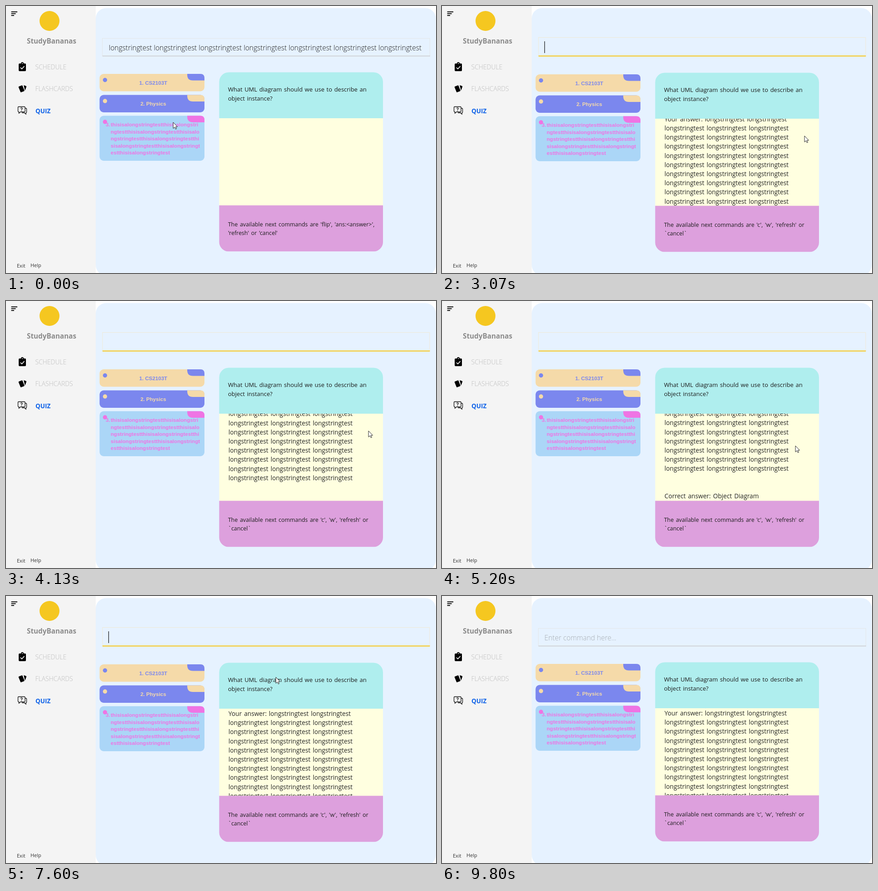
An HTML page that plays this animation: 949 by 590 pixels, repeating every 9.94 s.

```html
<!DOCTYPE html>
<html lang="en">
<head>
<meta charset="utf-8">
<title>StudyBananas</title>
<style>
html, body { margin: 0; width: 100%; height: 100%; overflow: hidden; background: #fff; }
svg { display: block; width: 949px; height: 590px; }
text { white-space: pre; font-family: "Open Sans", "Noto Sans", sans-serif; }
.menu { font-size: 14px; font-weight: 300; fill: #bcbcbc; }
.foot { font-size: 11px; fill: #333; }
.input { font-size: 15.5px; font-weight: 300; }
.topic text { font: bold 11.6px "Liberation Sans", Arial, sans-serif; }
.ask { font-size: 13px; word-spacing: 1.2px; fill: #1c1c1c; }
.reply { font-size: 13.7px; word-spacing: 1.6px; fill: #262626; }
.hint { font-size: 12.4px; word-spacing: 1.5px; fill: #1c1c1c; }
</style>
</head>
<body>
<svg viewBox="0 0 949 590">
  <defs>
    <clipPath id="cardClip"><rect x="470.500" y="146.500" width="361.500" height="396" rx="21"/></clipPath>
    <clipPath id="replyClip"><rect x="471" y="248" width="361" height="192.500"/></clipPath>
  </defs>

  <rect width="198" height="590" fill="#f4f4f4"/>
  <rect x="198" y="4.500" width="750.500" height="591" rx="23" fill="#e6f2ff"/>

  <path d="M11.500 13H25M11.500 17H21.500M11.500 21H18" stroke="#111" stroke-width="1.800"/>
  <circle cx="96" cy="33" r="22" fill="#f5c720"/>
  <text x="46" y="83" font-size="15.300" font-weight="700" fill="#8b8b8b">StudyBananas</text>

  <path d="M30 127H33A3 3 0 0 1 39 127H42Q44 127 44 129V142Q44 144 42 144H30Q28 144 28 142V129Q28 127 30 127Z"/>
  <path d="M32 136L35 139L40.500 133" fill="none" stroke="#fff" stroke-width="1.700"/>
  <circle cx="36" cy="127.300" r="1" fill="#fff"/>
  <g transform="translate(36 182.500)">
    <path d="M3 -7.500L8.200 -5.800Q9.300 -5.300 9 -4.100L6 4.500Z"/>
    <rect x="-5.800" y="-7.500" width="10.500" height="15" rx="2" transform="translate(-1.300 .3) rotate(-22)" stroke="#f4f4f4" stroke-width="1.200"/>
  </g>
  <g fill="none" stroke="#111" stroke-width="1.300">
    <path d="M28 222.500H40.500Q42 222.500 42 224V232.500Q42 234 40.500 234H32L28.500 237V234H28Q26.500 234 26.500 232.500V224Q26.500 222.500 28 222.500Z"/>
    <path d="M42 226H44Q45.500 226 45.500 227.500V234.500Q45.500 236 44 236V239L40.500 236H35"/>
    <path d="M32.300 226.500Q32.500 224.800 34.300 224.800Q36.200 224.900 36.200 226.500Q36.200 227.600 34.300 228.500V230M34.300 231V232.200"/>
  </g>
  <text class="menu" x="64.500" y="139.500">SCHEDULE</text>
  <text class="menu" x="64.500" y="188">FLASHCARDS</text>
  <text x="65" y="236.500" font-size="13.600" font-weight="700" fill="#0f62e8">QUIZ</text>
  <text class="foot" x="24" y="577.500">Exit</text>
  <text class="foot" x="54" y="576.500">Help</text>

  <g id="idle">
    <rect x="212.500" y="71.500" width="723" height="39" fill="none" stroke="#e4e7e8"/>
    <path d="M213 110.500H936" stroke="#c9c9c9" stroke-width="1.300"/>
  </g>
  <g id="active">
    <rect x="213" y="69.500" width="722" height="41" fill="none" stroke="#efe9d6"/>
    <path d="M213 110.500H935.500" stroke="#f9c614" stroke-width="2"/>
  </g>
  <text id="typed" class="input" fill="#1b1b1b"></text>
  <text id="prompt" class="input" x="226" y="97.500" fill="#a5abb1">Enter command here...</text>
  <path id="caret" stroke="#111" stroke-width="1.200"/>

  <g id="body">
    <g id="topics"></g>
    <g clip-path="url(#cardClip)">
      <rect x="470" y="146" width="362" height="102" fill="#afeeee"/>
      <rect x="470" y="248" width="362" height="193" fill="#ffffe0"/>
      <rect x="470" y="440.500" width="362" height="102" fill="#dda0dd"/>
    </g>
    <text class="ask" x="490" y="189">What UML diagram should we use to describe an</text>
    <text class="ask" x="490" y="209">object instance?</text>
    <g clip-path="url(#replyClip)"><g id="reply"></g></g>
    <text class="hint" id="hint1" x="490" y="487"></text>
    <text class="hint" id="hint2" x="490" y="506"></text>
  </g>

  <path id="arrow" d="M0 0V13.500L3.200 10.700L5.400 15.200L7.400 14.200L5.300 9.900H9.400Z" fill="#fff" stroke="#111" stroke-width="0.900"/>
  <path id="beam" d="M-2.500 -6H-.5L0 -5.500L.5 -6H2.500M0 -5.500V5.500M-2.500 6H-.5L0 5.500L.5 6H2.500" fill="none" stroke="#111"/>
</svg>
<script>
const LOOP = 9940, FPS = 15;
const CLICK = 730, ENTER = 1600, BLUR = 9800;
const NOTCH = 10.2, LINE = 20.2, ROWS = 10;
const WORD = "longstringtest";

// pointer path: time, x, y
const path = [
  [70, 369, 257], [330, 440, 185], [530, 590, 106], [670, 615, 98],
  [1940, 615, 98], [2130, 662, 140], [2400, 770, 270], [2600, 811, 338], [2800, 800, 287],
  [4530, 800, 287], [4800, 796, 305], [5200, 780, 320],
  [6200, 780, 320], [6600, 698, 279],
  [7330, 698, 279], [7600, 604, 181], [7730, 330, 128], [7800, 66, 120], [7930, 100, 128],
  [8870, 100, 128], [9200, 150, 330], [9500, 260, 520], [9730, 330, 606]
];
// scroll position in wheel notches from a given time on
const wheel = [
  [0, 0], [3070, 1], [3330, 2], [3530, 3], [3930, 4], [4000, 5],
  [4200, 6], [4270, 7], [5470, 5], [5530, 3], [5670, 1], [5730, 0]
];

const $ = id => document.getElementById(id);
const repeat = n => Array(n).fill(WORD).join(" ");

function add(parent, tag, attrs, content = "") {
  const node = document.createElementNS("http://www.w3.org/2000/svg", tag);
  for (const key in attrs) node.setAttribute(key, attrs[key]);
  node.textContent = content;
  parent.append(node);
  return node;
}

function topic(y, height, fill, ink, label) {
  const g = add($("topics"), "g", { class: "topic", transform: `translate(206.500 ${y})` });
  add(g, "rect", { width: 231.5, height, rx: 9, fill });
  add(g, "path", { d: "M193.500 0H222.500Q231.500 0 231.500 9V14.500H206Q193.500 14.500 193.500 2Z", fill: ink });
  add(g, "circle", { cx: 12, cy: 13.5, r: 4.7, fill: ink });
  if (label) add(g, "text", { x: 118.5, y: 23.5, "text-anchor": "middle", fill: ink }, label);
  return g;
}

function build() {
  const peach = "#f5daa9", indigo = "#7b87ee", pink = "#ef74e4";
  topic(150, 38.5, peach, indigo, "1. CS2103T");
  topic(196.5, 38.5, indigo, peach, "2. Physics");
  const long = topic(242.5, 99.5, "#abd6f7", pink);
  add(long, "text", { x: 13.5, y: 23.5, fill: pink }, "3.");
  const name = "thisisalongstringtest".repeat(8);
  [0, 36, 72, 108, 144].forEach((at, i) =>
    add(long, "text", { x: 24.5, y: 23.5 + i * 15.5, fill: pink }, name.slice(at, i < 4 ? at + 36 : 168)));

  const row = (i, x, s) => add($("reply"), "text", { class: "reply", x, y: 264 + i * LINE }, s);
  row(0, 491, "Your answer:");
  row(0, 580, repeat(2));
  for (let i = 1; i < ROWS; i++) row(i, 491, repeat(3));
  row(ROWS + 2, 491, "Correct answer: Object Diagram");
  $("typed").textContent = repeat(7);
}

function pointer(t) {
  if (t <= path[0][0]) return path[0].slice(1);
  const i = path.findIndex(p => p[0] > t);
  if (i < 0) return path[path.length - 1].slice(1);
  const [t0, x0, y0] = path[i - 1], [t1, x1, y1] = path[i];
  const k = (t - t0) / (t1 - t0);
  return [x0 + (x1 - x0) * k, y0 + (y1 - y0) * k];
}

const show = (id, on) => $(id).setAttribute("visibility", on ? "visible" : "hidden");
const move = (id, x, y) => $(id).setAttribute("transform", `translate(${x} ${y})`);

function draw(time) {
  const t = Math.floor((time + 4) * FPS / 1000) * 1000 / FPS + 4;
  const focus = t >= CLICK && t < BLUR, sent = t >= ENTER;

  show("idle", !focus);
  show("active", focus);
  show("typed", !sent);
  show("prompt", sent && !focus);
  $("typed").setAttribute("x", focus ? 228 : 227);
  $("typed").setAttribute("y", focus ? 96.5 : 97.5);
  move("body", 0, focus ? 1 : 0);

  const lit = sent ? (t - ENTER) % 1000 < 520 : t < 1270;
  show("caret", focus && lit);
  $("caret").setAttribute("d", `M${sent ? 226.5 : 614.5} 78V104`);

  show("reply", sent);
  const notches = wheel.filter(w => w[0] <= t).pop()[1];
  move("reply", 0, -notches * NOTCH);
  $("hint1").textContent = "The available next commands are " +
    (sent ? "'c', 'w', 'refresh' or" : "'flip', 'ans:<answer>',");
  $("hint2").textContent = sent ? "`cancel`" : "'refresh' or 'cancel'";

  const [x, y] = pointer(t);
  const inField = x > 213 && x < 936 && y > 69 && y < 111;
  show("arrow", !inField);
  show("beam", inField);
  move("arrow", x, y);
  move("beam", x, y);
}

function tick() {
  draw(performance.now() % LOOP);
  requestAnimationFrame(tick);
}
build();
tick();
</script>
</body>
</html>
```
